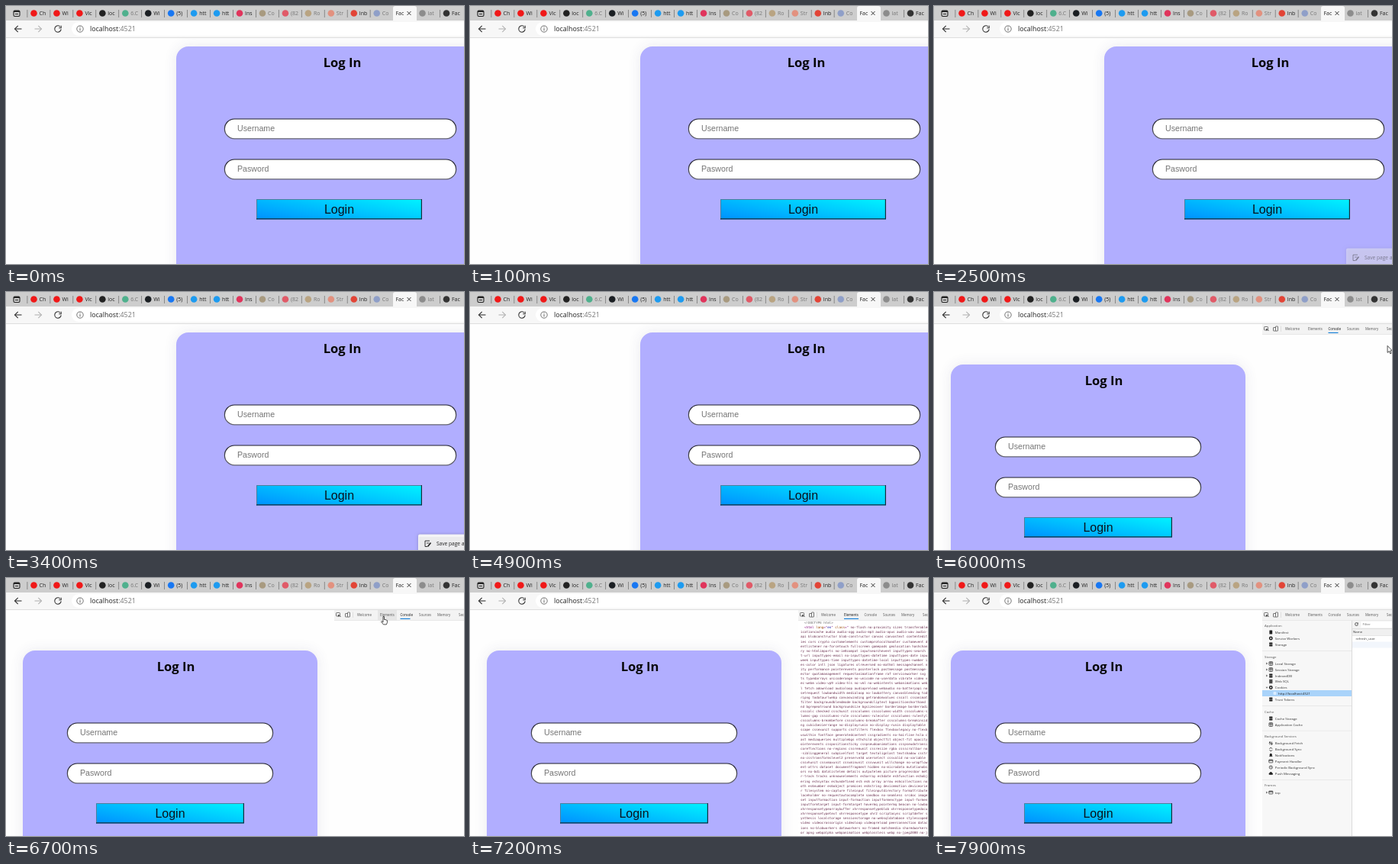
An HTML page with a canvas for the animation above (8 s loop, 600 px wide and 338 px high).

```html
<!DOCTYPE html>
<html lang="en">
<head>
<meta charset="utf-8">
<title>Login page with developer tools</title>
<style>
html, body { margin: 0; width: 100%; height: 100%; overflow: hidden; background: #fff; }
canvas { display: block; width: 600px; height: 338px; }
</style>
</head>
<body>
<canvas id="stage"></canvas>
<script>
const W = 600, H = 338, LOOP = 8000, STEP = 100;
const UI = '"Open Sans", "Noto Sans", sans-serif';
const ARIAL = '"Liberation Sans", Arial, sans-serif';
const MONO = '"DejaVu Sans Mono", monospace';
const canvas = document.getElementById('stage');
const dpr = window.devicePixelRatio || 1;
canvas.width = W * dpr;
canvas.height = H * dpr;
const c = canvas.getContext('2d');

// label, icon colour, dimmed
const TABS = [
  ['Ch', '#f01818'], ['Wi', '#f01818'], ['Vic', '#f01818'], ['loc', '#222'],
  ['6.C', '#4fb08d', 1], ['Wi', '#1b1f23'], ['(5)', '#1877f2'], ['htt', '#1d9bf0'],
  ['htt', '#1d9bf0'], ['Ins', '#e0345c'], ['Co', '#a89a80', 1], ['(82', '#e05a68', 1],
  ['Ro', '#b9a482', 1], ['Str', '#e2917f', 1], ['Inb', '#e24436'], ['Co', '#8f9fc8', 1]
];

const TOOLS = ['Welcome', 'Elements', 'Console', 'Sources', 'Memory', 'Security', 'Lighthouse'];
const TOOL_X = [460, 490, 516.5, 541, 565, 593, 620];

// y, label, icon, expandable
const TREE = [
  [71, 'Manifest', 'file'], [79, 'Service Workers', 'gear'], [87, 'Storage', 'db'],
  [112, 'Local Storage', 'grid', 1], [120, 'Session Storage', 'grid', 1],
  [128, 'IndexedDB', 'db', 1], [135.5, 'Web SQL', 'db'], [143.5, 'Cookies', 'gear', 1],
  [159, 'Trust Tokens', 'db'], [184, 'Cache Storage', 'db'], [192, 'Application Cache', 'grid'],
  [216.5, 'Background Fetch', 'swap'], [224.5, 'Background Sync', 'sync'],
  [232, 'Notifications', 'bell'], [240, 'Payment Handler', 'card'],
  [248, 'Periodic Background Sync', 'clock'], [256, 'Push Messaging', 'cloud'],
  [281, 'top', 'frame', 1]
];
const HEADS = [[62, 'Application'], [103, 'Storage'], [175, 'Cache'],
  [207.5, 'Background Services'], [271.5, 'Frames']];

const CODE = `icationcache audio audio-ogg audio-mp3 audio-opus audio-wav audio-
api blobconstructor blob-constructor canvas canvastext contentedit
ies cors crypto customelements customprotocolhandler customevent d
entlistener no-forcetouch fullscreen gamepads geolocation hashchan
ry no-htmlimports no-ie8compat inputsearchevent inputtypes-search
t-url inputtypes-email no-inputtypes-datetime inputtypes-date inpu
week inputtypes-time inputtypes-datetime-local inputtypes-number i
es-color intl json ligatures olreversed no-mathml messagechannel n
ity performance pointerevents pointerlock postmessage postmessage-
ector quotamanagement requestanimationframe raf serviceworker svg
ts typedarrays unicoderange no-unicode no-userdata vibrate video v
ec-webm video-vp9 video-hls no-vml no-webintents webanimations web
l fetch adownload audioloop audiopreload webaudio no-batteryapi no
setrequest lowbandwidth medialoop no-lowbattery canvasblending tod
ripng todataurlwebp canvaswinding getrandomvalues cssall cssanimat
filter backgroundblendmode backgroundcliptext bgpositionshorthand
nd bgrepeatround backgroundsize bgsizecover borderimage borderradi
csscalc checked csschunit csscolumns csscolumns-width csscolumns-s
lumns-gap csscolumns-rule csscolumns-rulecolor csscolumns-rulestyl
csscolumns-breakbefore csscolumns-breakafter csscolumns-breakinsid
ng cubicbezierrange no-displayrunin no-display-runin displaytable
scape cssexunit supports cssfilters flexbox flexboxlegacy no-flexb
uswithin fontface generatedcontent cssgradients no-hairline hsla c
ast mediaqueries multiplebgs nthchild objectfit object-fit opacity
ointerevents csspositionsticky csspseudoanimations csspseudotransi
coreflections no-regions cssremunit cssresize rgba cssscrollbar no
-siblinggeneral subpixelfont target textalignlast textshadow csstr
no-csstransformslevel2 preserve3d userselect cssvalid no-variable
cssvhunit cssvmaxunit cssvminunit cssvwunit willchange no-wrapflow
ent-attrs dataset documentfragment hidden no-microdata mutationobs
ors no-bdi datalistelem details outputelem picture progressbar met
r-track tracks unknownelements es5array es5date es5function es5obj
ering es5syntax es5undefined es5 es6 array arrow es6collections no
oth es6number es6object promises es6string devicemotion deviceorie
r filesystem no-capture fileinput fileinputdirectory formattribute
laceholder no-requestautocomplete sandbox no-seamless srcdoc image
set inputformaction input-formaction inputformenctype input-formen
inputformtarget input-formtarget hovermq pointermq beacon no-lowba
xhrresponsetypearraybuffer xhrresponsetypeblob xhrresponsetypedocu
xhrresponsetypetext xhrresponsetype xhr2 scriptasync scriptdefer s
ynthesis localstorage sessionstorage no-websqldatabase stylescoped
video videocrossorigin videoloop videopreload peerconnection datac
ions no-blobworkers dataworkers no-framed matchmedia sharedworkers
or apng webpalpha webpanimation webplossless webp no-jpeg2000 no-j`.split('\n');

const clamp = v => Math.max(0, Math.min(1, v));
const ramp = (t, a, b) => clamp((t - a) / (b - a));
const ease = p => p * p * (3 - 2 * p);

function rect(x, y, w, h, fill) {
  c.fillStyle = fill;
  c.fillRect(x, y, w, h);
}

function round(x, y, w, h, r, fill, stroke, lw = 1) {
  c.beginPath();
  c.roundRect(x, y, w, h, r);
  if (fill) { c.fillStyle = fill; c.fill(); }
  if (stroke) { c.strokeStyle = stroke; c.lineWidth = lw; c.stroke(); }
}

function disc(x, y, r, fill) {
  c.beginPath();
  c.arc(x, y, r, 0, 7);
  c.fillStyle = fill;
  c.fill();
}

function ring(x, y, r, color, lw = 1, a = 0, b = Math.PI * 2) {
  c.beginPath();
  c.arc(x, y, r, a, b);
  c.strokeStyle = color;
  c.lineWidth = lw;
  c.stroke();
}

function line(pts, color, lw = 1) {
  c.beginPath();
  for (let i = 0; i < pts.length; i += 2) c.lineTo(pts[i], pts[i + 1]);
  c.strokeStyle = color;
  c.lineWidth = lw;
  c.stroke();
}

function text(s, x, y, size, color, family = UI, weight = 400, align = 'left') {
  c.font = `${weight} ${size}px ${family}`;
  c.textAlign = align;
  c.fillStyle = color;
  c.fillText(s, x, y);
}

function reload(x, y, r, color, lw) {
  ring(x, y, r, color, lw, 0.1, 5.5);
  line([x + r, y - r, x + r, y - r * 0.3, x + r * 0.3, y - r * 0.3], color, lw);
}

function tab(x, label, color, dim) {
  disc(x, 9.5, 4.3, color);
  c.save();
  c.beginPath();
  c.rect(x + 6, 0, 14, 19);
  c.clip();
  text(label, x + 7, 12.2, 7, dim ? '#777' : '#222');
  c.restore();
}

function browser() {
  rect(0, 0, W, 19, '#cdcdcd');
  rect(0, 19, W, 22, '#f7f7f7');
  rect(0, 41, W, 1, '#dedede');

  round(10, 6, 8, 7.5, 1.5, null, '#222', 1.1);
  rect(10, 6, 8, 2, '#222');
  line([12, 10.5, 16, 10.5], '#222', 1);

  TABS.forEach(([label, color, dim], i) => {
    const x = 36.5 + i * 29.95;
    rect(x - 9, 5, 0.8, 10, '#777');
    tab(x, label, color, dim);
  });
  round(507, 0, 31, 22, [3, 3, 0, 0], '#f7f7f7');
  text('Fac', 510.5, 12.2, 7, '#222');
  rect(521, 2, 4, 14, '#f7f7f7');
  line([525.5, 7, 530.5, 12], '#222', 0.9);
  line([530.5, 7, 525.5, 12], '#222', 0.9);
  tab(545.5, 'lat', '#8c8c8c', 1);
  rect(568, 5, 0.8, 10, '#777');
  tab(577, 'Fac', '#333');

  [[16, 1, '#333'], [42, -1, '#b5b5b5']].forEach(([x, d, color]) => {
    line([x - 4.5 * d, 30, x + 4.5 * d, 30], color, 1.1);
    line([x - 0.3 * d, 25.8, x - 4.5 * d, 30, x - 0.3 * d, 34.2], color, 1.1);
  });
  reload(68, 30, 4.2, '#333', 1.1);
  round(86, 21, 540, 18, 9, '#fff');
  ring(97, 30, 4.2, '#666', 0.9);
  rect(96.5, 29, 1, 3.4, '#666');
  rect(96.5, 27, 1, 1, '#666');
  text('localhost', 110, 33.3, 8.9, '#222');
  const w = c.measureText('localhost').width;
  text(':4521', 110 + w, 33.3, 8.9, '#777');
}

function field(x, y, w, label) {
  const edge = c.createLinearGradient(0, y, 0, y + 26);
  edge.addColorStop(0, '#1c1c28');
  edge.addColorStop(1, '#66666f');
  round(x + 0.4, y, w - 0.8, 25.8, 12.9, '#fff', edge, 1.2);
  text(label, x + 17, y + 16.2, 10.65, '#757575', ARIAL);
}

function button(x, y, w, h) {
  const a = Math.PI / 18, sx = Math.sin(a), sy = Math.cos(a);
  const half = (w * sx + h * sy) / 2, mx = x + w / 2, my = y + h / 2;
  const g = c.createLinearGradient(mx - sx * half, my + sy * half, mx + sx * half, my - sy * half);
  g.addColorStop(0, '#0090ff');
  g.addColorStop(1, '#00f4ff');
  rect(x, y, w, h, g);
  line([x + 0.5, y + h, x + 0.5, y + 0.5, x + w, y + 0.5], '#4c7f9c', 1);
  line([x, y + h - 0.6, x + w - 0.6, y + h - 0.6, x + w - 0.6, y], '#15303c', 1.2);
  text('Login', mx, y + 19.3, 16, '#08131c', ARIAL, 400, 'center');
}

function card(x, y, w, title, fx, fw, bx, bw) {
  c.save();
  c.shadowColor = 'rgba(60,60,110,.1)';
  c.shadowBlur = 18 * dpr;
  round(x, y, w, 400, 16, '#b1aeff');
  c.restore();
  text('Log In', title, y + 26.6, 16.6, '#050505', UI, 700, 'center');
  field(fx, y + 95, fw, 'Username');
  field(fx, y + 148, fw, 'Pasword');
  button(bx, y + 200, bw, 26.5);
}

function menu(t) {
  if (t < 2500 || t >= 4400) return;
  c.save();
  c.globalAlpha = 0.45 + 0.55 * ramp(t, 2500, 2900);
  c.shadowColor = 'rgba(0,0,0,.2)';
  c.shadowBlur = 4 * dpr;
  round(540, 317.5, 90, 60, 2, '#f4f4f6');
  c.shadowColor = 'transparent';
  const hover = ramp(t, 3000, 3300) * (1 - ramp(t, 3300, 3500));
  if (hover) rect(541, 321, 70, 17, `rgba(0,0,0,${0.07 * hover})`);
  line([555, 326, 549, 326, 549, 333.5, 552, 333.5], '#222', 0.9);
  line([551, 329, 554.5, 329], '#222', 0.8);
  line([552.5, 333.5, 556.5, 328.5], '#222', 1.5);
  text('Save page as', 564, 332.4, 6.6, '#222');
  c.restore();
}

function toolbar(t) {
  const early = t < 5100;
  rect(430, 42, 170, 14, '#f3f3f3');
  rect(430, 55.5, 170, 0.5, '#dcdcdc');
  if (t >= 6400 && t < 6800) rect(487, 42, 25, 13.5, '#e6e6e6');
  if (!early) {
    round(432.5, 45.5, 5, 4.5, 0.8, null, '#444', 0.7);
    line([438.5, 51, 435.5, 48, 435.5, 50.5], '#222', 0.8);
    round(444.5, 46.5, 4, 4.5, 0.5, null, '#444', 0.7);
    round(447.5, 45, 3, 6, 0.5, '#f3f3f3', '#444', 0.7);
    rect(454, 44.5, 0.5, 7.5, '#ccc');
  }
  const active = early || t >= 7800 ? -1 : t >= 6800 ? 1 : 2;
  TOOLS.forEach((s, i) => {
    text(s, TOOL_X[i] - (early ? 23.5 : 0), 49.8, 4.4, i === active ? '#111' : '#555');
  });
  if (active > 0) rect(TOOL_X[active], 52.8, active === 1 ? 19 : 13, 1.2, '#1a82d8');
}

function elements() {
  rect(430, 56, 170, 282, '#fff');
  text('<!DOCTYPE html>', 438, 59.8, 4.2, '#666', MONO);
  let x = 438;
  [['<html', '#881280'], [' lang', '#994500'], ['="', '#881280'], ['en', '#1a1aa6'],
    ['" ', '#881280'], ['class', '#994500'], ['="', '#881280'],
    [' no-flash no-proximity sizes transferables', '#6c3050']].forEach(([s, color]) => {
    text(s, x, 66.2, 4.2, color, MONO);
    x += c.measureText(s).width;
  });
  CODE.forEach((s, i) => text(s, 433, 72.3 + i * 6.1, 4.2, '#6c3050', MONO));
}

function glyph(kind, x, y) {
  const k = '#222';
  if (kind === 'db') {
    for (let i = -1; i < 2; i++) round(x - 2.3, y - 0.7 + i * 1.8, 4.6, 1.4, 0.7, k);
  } else if (kind === 'grid') {
    round(x - 2.3, y - 2.3, 4.6, 4.6, 0.4, null, k, 0.7);
    line([x - 2.3, y - 0.7, x + 2.3, y - 0.7], k, 0.7);
    line([x, y - 2.3, x, y + 2.3], k, 0.7);
  } else if (kind === 'file') {
    round(x - 1.9, y - 2.5, 3.8, 5, 0.5, k);
  } else if (kind === 'gear') {
    ring(x, y, 1.7, k, 1.5);
  } else if (kind === 'clock') {
    ring(x, y, 2.1, k, 0.7);
    line([x, y - 1.4, x, y, x + 1, y + 0.6], k, 0.6);
  } else if (kind === 'sync') {
    ring(x, y, 2, k, 0.8, 0.4, 2.7);
    ring(x, y, 2, k, 0.8, 3.5, 5.8);
  } else if (kind === 'swap') {
    line([x - 2.3, y, x - 1.2, y - 2, x, y], k, 0.7);
    line([x - 1.2, y - 2, x - 1.2, y + 2], k, 0.7);
    line([x, y, x + 1.2, y + 2, x + 2.3, y], k, 0.7);
    line([x + 1.2, y + 2, x + 1.2, y - 2], k, 0.7);
  } else if (kind === 'bell') {
    round(x - 1.5, y - 2.2, 3, 3.6, [1.5, 1.5, 0, 0], k);
    rect(x - 2.1, y + 1, 4.2, 0.7, k);
  } else if (kind === 'cloud') {
    disc(x, y - 0.4, 1.7, k);
    round(x - 2.7, y - 0.4, 5.4, 2.2, 1.1, k);
  } else {
    round(x - 2.5, y - 1.9, 5, 3.8, 0.5, null, k, 0.7);
    rect(x - 2.5, y - 1.5, 5, 1, k);
  }
}

function application(full) {
  rect(430, 56, 170, 282, '#fff');
  rect(430, 56, 117, 282, '#f7f7f7');
  rect(547, 56, 0.7, 282, '#ccc');
  [95, 167, 199.8, 264].forEach(y => rect(430, y, 117, 0.6, '#e0e0e0'));
  HEADS.forEach(([y, s]) => text(s, 433, y + 1.5, 4.35, '#555'));
  rect(430, 147, 117, 8, '#a9d3fa');
  TREE.forEach(([y, s, kind, open]) => {
    glyph(kind, 441.3, y);
    text(s, 446.8, y + 1.5, 4.35, '#333');
    if (!open) return;
    c.beginPath();
    if (s === 'Cookies') { c.moveTo(434.6, y - 0.8); c.lineTo(437.4, y - 0.8); c.lineTo(436, y + 1.2); }
    else { c.moveTo(435.2, y - 1.4); c.lineTo(437.2, y); c.lineTo(435.2, y + 1.4); }
    c.fillStyle = '#666';
    c.fill();
  });
  round(444.5, 149, 4, 4, 1, '#d9ecff');
  text('http://localhost:4521', 451, 152.6, 4.35, '#222');
  if (!full) return;
  rect(548, 56, 52, 10, '#f3f3f3');
  reload(553.5, 60.5, 1.9, '#333', 0.8);
  rect(559.5, 57, 40.5, 8, '#fff');
  text('Filter', 561.5, 62.2, 4.35, '#666');
  rect(548, 66, 52, 9, '#f0f0f0');
  rect(548, 66, 52, 0.5, '#ccc');
  rect(548, 75, 52, 0.5, '#ccc');
  text('Name', 549, 72.2, 4.35, '#333');
  text('refresh_user', 552.5, 80.8, 4.35, '#333');
  rect(548, 83.5, 52, 8, '#f2f6fc');
}

function shape(pts, x, y) {
  c.beginPath();
  for (let i = 0; i < pts.length; i += 2) c.lineTo(x + pts[i], y + pts[i + 1]);
  c.closePath();
  c.lineJoin = 'round';
  c.fillStyle = '#fff';
  c.fill();
  c.strokeStyle = '#222';
  c.lineWidth = 0.8;
  c.stroke();
}

const HAND = [-1, 0, 0.4, 0, 0.6, 4, 2, 4, 3.2, 4.6, 4.4, 5, 4.4, 8, 3.4, 10.4,
  -0.6, 10.4, -3.4, 6.8, -2.8, 6, -1, 7.4];
const ARROW = [0, 0, 0, 9, 2.1, 7.2, 3.6, 10.4, 5, 9.8, 3.6, 6.6, 6.2, 6.4];

function cursor(t) {
  if (t < 6000 || t >= 7200) return;
  const inP = ease(ramp(t, 5900, 6500)), out = ramp(t, 6800, 7100);
  const x = 602 - 107 * inP + 112 * out;
  const y = 72 - 21.5 * inP + 2 * out;
  shape(t >= 6400 && t < 6900 ? HAND : ARROW, x, y);
}

function draw(t) {
  c.setTransform(dpr, 0, 0, dpr, 0, 0);
  rect(0, 0, W, H, '#fefefe');
  if (t < 5000) {
    card(223, 53, 429, 440.5, 286, 304, 328, 217);
  } else {
    card(22, 95, 386, 222.5, 80, 270, 118, 194);
    if (t >= 7800) application(t >= 7900);
    else if (t >= 6800) elements();
    toolbar(t);
    cursor(t);
  }
  menu(t);
  browser();
}

function tick() {
  const t = performance.now() % LOOP;
  draw(Math.floor(t / STEP) * STEP);
  requestAnimationFrame(tick);
}
tick();
</script>
</body>
</html>
```
